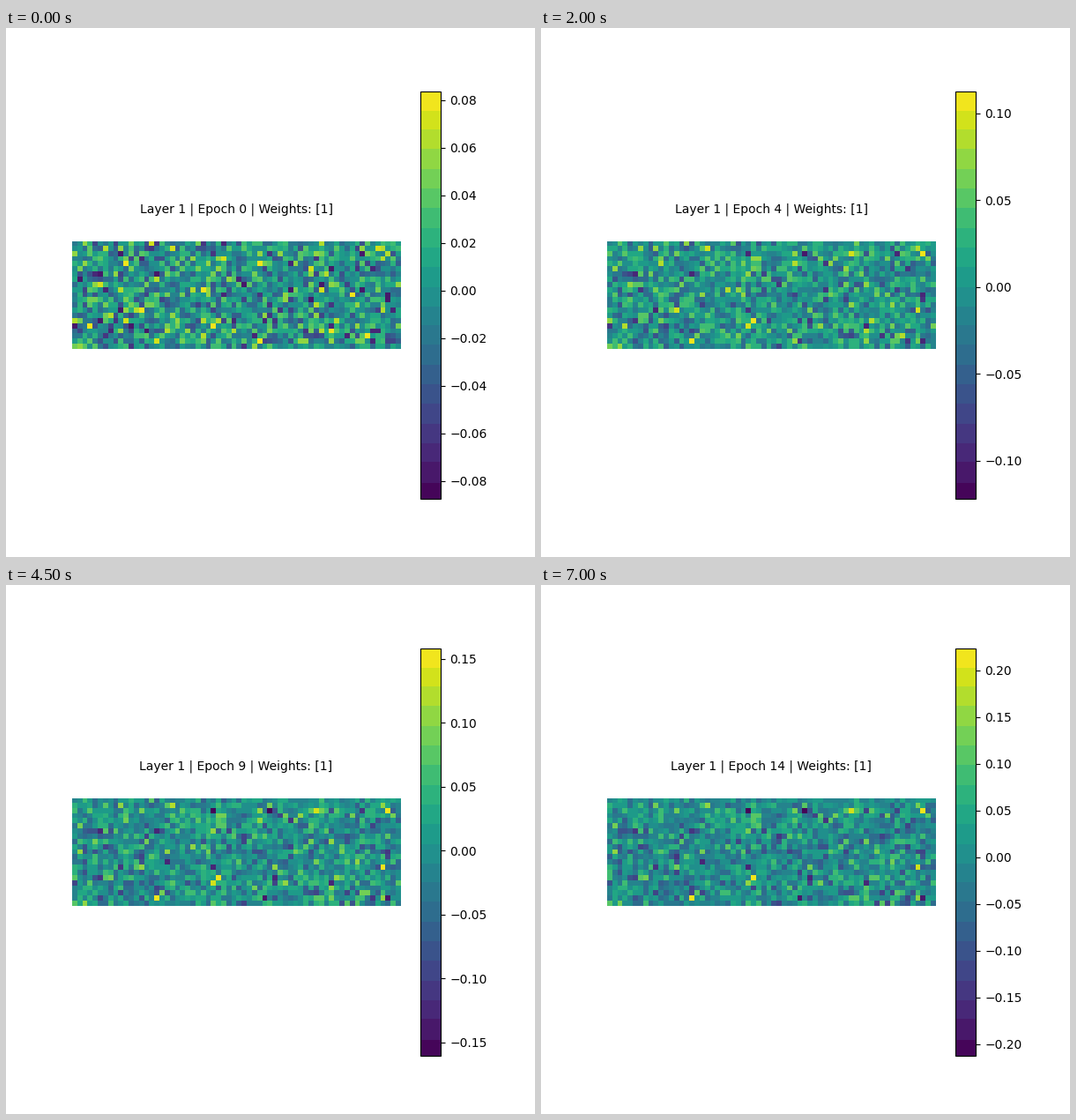
Animation of 600x600 px, one loop 7.5 s. Source, as a matplotlib script:

```python
import matplotlib.pyplot as plt
import numpy as np
from matplotlib.animation import FuncAnimation
from matplotlib.colors import ListedColormap

ROWS, COLS = 21, 64
EPOCHS = 15
STEP_MS = 500

# Colour range at a few key epochs, linear in between
KEYS = [0, 2, 4, 7, 9, 10, 12, 14]
LOW = [-0.0876, -0.0996, -0.1220, -0.1491, -0.1606, -0.1790, -0.1959, -0.2123]
HIGH = [0.0837, 0.1072, 0.1125, 0.1513, 0.1580, 0.1829, 0.1934, 0.2231]

# Weights (column, row) that training drives to the extremes
RISING = [(16, 19), (61, 2), (28, 15), (60, 13), (47, 2)]
FALLING = [(38, 2), (27, 2), (61, 19), (37, 19)]


def push(first, last, cells, start, end):
    for (col, row), part in zip(cells, np.linspace(1, 0.85, len(cells))):
        first[row, col], last[row, col] = start * part, end * part


def make_weights():
    """First and last weight matrices; training moves between them."""
    rng = np.random.default_rng(4)
    first = np.clip(rng.normal(0, 0.031, (ROWS, COLS)), -0.08, 0.08)
    drift = rng.normal(0, 0.048, (ROWS, COLS))
    drift[0] = 0
    last = np.clip(first + drift, -0.16, 0.16)
    push(first, last, RISING, 0.068, HIGH[-1])
    push(first, last, FALLING, -0.060, LOW[-1])
    return first, last


def banded_viridis(width=12.3, offset=2.3):
    band = (np.arange(256) + offset) // width
    shade = (band + 0.5) * width - offset
    return ListedColormap(plt.get_cmap("viridis")(np.clip(shade / 255, 0, 1)))


first, last = make_weights()

plt.rcParams["font.family"] = "DejaVu Sans"
fig, ax = plt.subplots(figsize=(6, 6), dpi=100)
ax.axis("off")
image = ax.imshow(first, cmap=banded_viridis(), interpolation="nearest",
                  vmin=LOW[0], vmax=HIGH[0])
fig.colorbar(image, ax=ax)
title = fig.text(0.435, 391 / 600, "", ha="center", va="baseline", fontsize=10)


def update(epoch):
    t = epoch / (EPOCHS - 1)
    image.set_data(first + (last - first) * t)
    image.set_clim(np.interp(epoch, KEYS, LOW), np.interp(epoch, KEYS, HIGH))
    title.set_text(f"Layer 1 | Epoch {epoch} | Weights: [1]")
    return image, title


anim = FuncAnimation(fig, update, frames=EPOCHS, interval=STEP_MS,
                     repeat=True, repeat_delay=0, blit=False)
plt.show()
```
